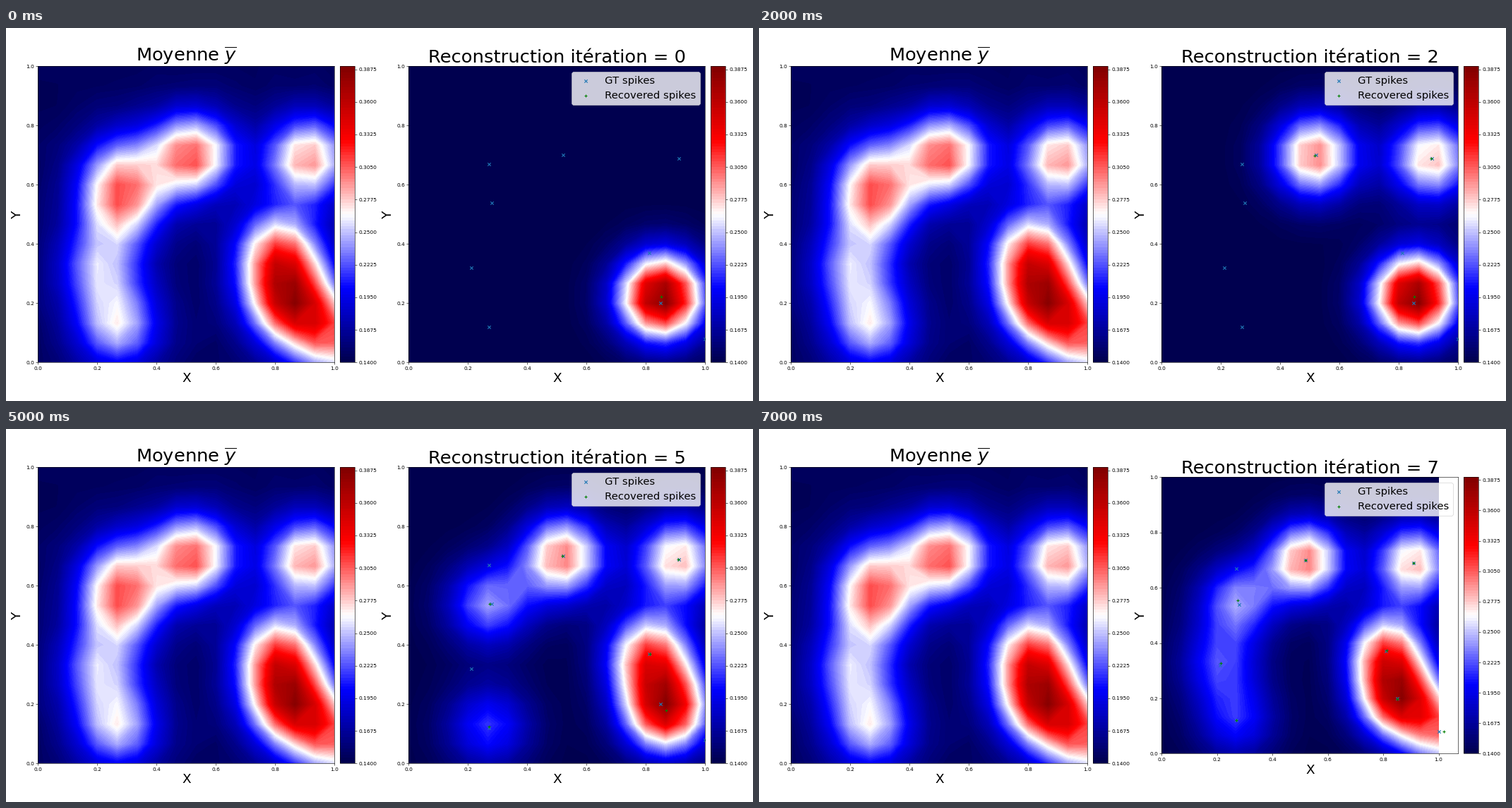
Animation, 1058 px wide and 529 px high, one loop 8000 ms. Source, as a matplotlib script:

```python
import numpy as np
import matplotlib.pyplot as plt
from matplotlib.animation import FuncAnimation

W, H = 1058, 529
SIDE = 420          # axes width in pixels
SIGMA = 0.1
LEVELS = np.linspace(0.14, 0.39, 101)

grid = np.linspace(0, 1, 16)
X, Y = np.meshgrid(grid, grid)

# x, y, amplitude of the true spikes
TRUTH = [(0.27, 0.67, 0.065), (0.52, 0.70, 0.165), (0.91, 0.69, 0.150),
         (0.28, 0.54, 0.128), (0.21, 0.32, 0.092), (0.27, 0.12, 0.109),
         (0.85, 0.20, 0.183), (0.81, 0.37, 0.152), (1.00, 0.08, 0.133)]

# spikes found after each iteration
blob = (0.852, 0.2226, 0.255)
top = (0.516, 0.699, 0.163)
top2 = (0.519, 0.700, 0.163)
right = (0.909, 0.690, 0.147)
pair = [(0.813, 0.370, 0.164), (0.868, 0.180, 0.218)]
mid = (0.274, 0.555, 0.098)
low = (0.270, 0.120, 0.068)
left = (0.212, 0.328, 0.072)
FOUND = [
    [blob],
    [blob, top],
    [blob, top, right],
    [top, right] + pair,
    [top2, right] + pair + [(0.272, 0.537, 0.100)],
    [top2, right] + pair + [(0.272, 0.540, 0.100), (0.270, 0.125, 0.075)],
    [top2, right] + pair + [mid, low, left],
    [top2, right, mid, low, left, (0.812, 0.374, 0.154),
     (0.851, 0.198, 0.198), (1.02, 0.08, 0.138)],
]


def field(spikes, base):
    z = base + 0 * X
    for x, y, a in spikes:
        z = z + a * np.exp(-((X - x) ** 2 + (Y - y) ** 2) / (2 * SIGMA ** 2))
    return np.clip(z, 0.1401, 0.3895)


def place(ax, cax, x0, span=1.0):
    """Square data units: a wider x range gives a lower box."""
    h = SIDE / span
    y0 = 54.6 + (SIDE - h) / 2
    ax.set_position([x0 / W, y0 / H, SIDE / W, h / H])
    cax.set_position([(x0 + SIDE + 7.94) / W, y0 / H, 0.05 * SIDE / W, h / H])


def panel(ax, z, title, span=1.0):
    cs = ax.contourf(X, Y, z, LEVELS, cmap="seismic")
    ax.set_title(title, fontsize=35)
    ax.set_xlabel("X", fontsize=25)
    ax.set_ylabel("Y", fontsize=25)
    ax.set_xlim(0, span)
    ax.set_ylim(0, 1)
    return cs


def marks(ax, spikes, **style):
    xs, ys, _ = zip(*spikes)
    ax.scatter(xs, ys, **style)


def draw(i):
    spikes = FOUND[i]
    reach = max(s[0] for s in spikes)
    span = 1.05 * reach if reach > 1 else 1.0
    ax2.clear()
    cs = panel(ax2, field(spikes, 0.1401), f"Reconstruction itération = {i}", span)
    marks(ax2, TRUTH, marker="x", color="C0", label="GT spikes")
    marks(ax2, spikes, marker="+", color="green", label="Recovered spikes")
    ax2.set_xlim(0, span)
    ax2.set_ylim(0, 1)
    ax2.legend(loc="upper right", fontsize=20)
    place(ax2, cax2, 570.4, span)
    return cs


fig = plt.figure(figsize=(20, 10), dpi=52.9)
ax1, cax1, ax2, cax2 = (fig.add_axes([0, 0, 1, 1], label=n) for n in "abcd")

rng = np.random.default_rng(4)
noise = rng.normal(0, 0.0013, X.shape)
mean = panel(ax1, field(TRUTH, 0.1475 - 0.002 * Y + noise),
             r"Moyenne $\overline{y}$")
place(ax1, cax1, 45.4)
fig.colorbar(mean, cax=cax1)
fig.colorbar(draw(0), cax=cax2)

anim = FuncAnimation(fig, draw, frames=len(FOUND), init_func=lambda: draw(0),
                     interval=1000, repeat=True, repeat_delay=0, blit=False)
plt.show()
```
